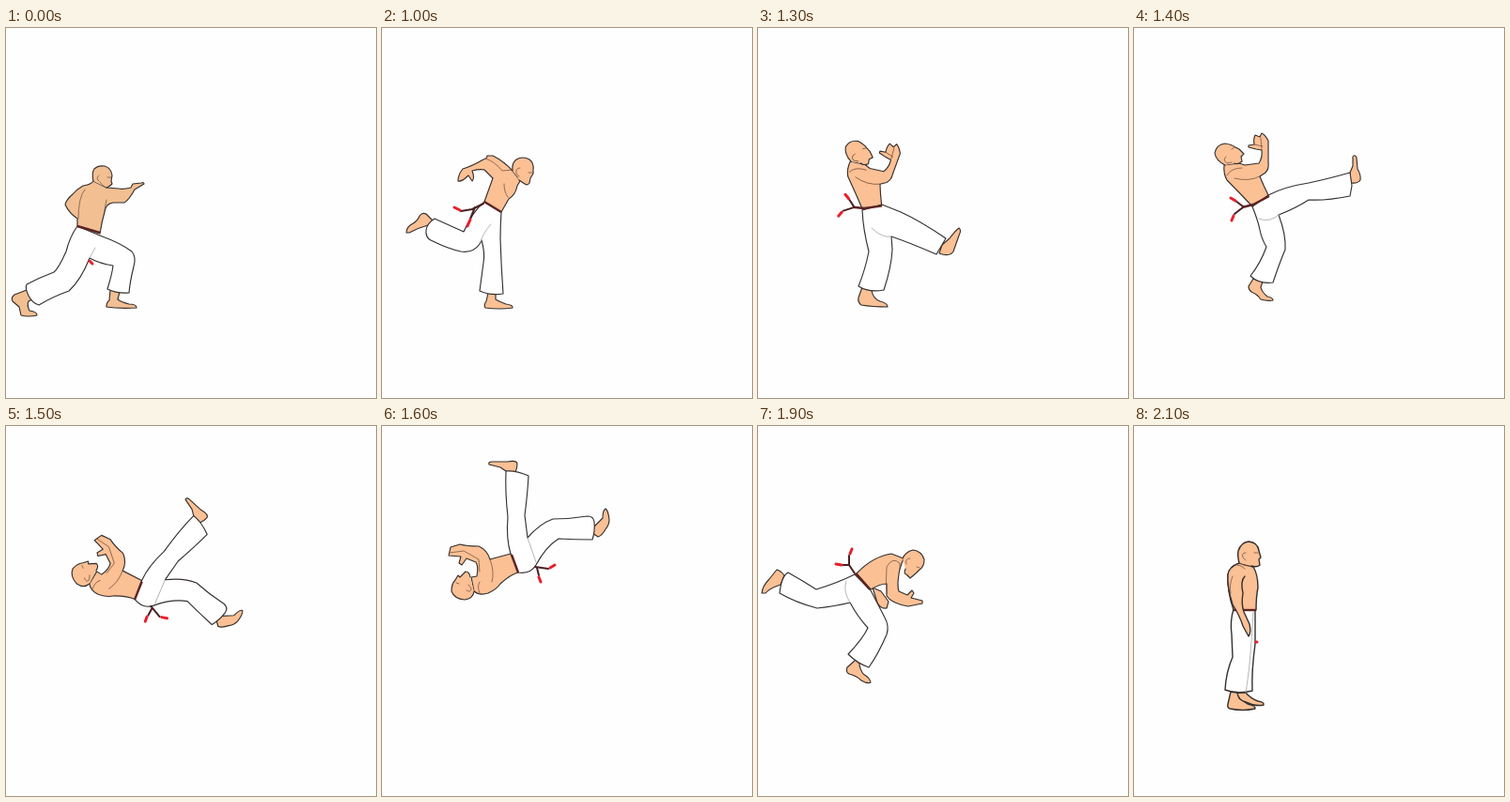
An HTML page without scripts for the animation above (2600 ms loop, 394 by 394 pixels).

```html
<!DOCTYPE html>
<html lang="en">
<head>
<meta charset="utf-8">
<title>Back flip kick</title>
<style>
html, body { margin: 0; width: 100%; height: 100%; overflow: hidden; background: #fefefe; }
svg { display: block; width: 100vw; height: 100vh; }
path { fill: none; stroke: #35302f; stroke-width: 1.15; stroke-linejoin: round; stroke-linecap: round; }
.skin { fill: #fbc094; }
.warm .skin { fill: #f1bf92; }
.cloth { fill: #fff; }
.bold .skin, .bold .cloth { stroke-width: 1.4; }
.line { stroke: #6b4a38; stroke-width: .7; }
.fold { stroke: #a5a5a5; stroke-width: .8; }
.belt { stroke: #5c2424; stroke-width: 2.4; stroke-linecap: butt; }
.cord { stroke: #4a2024; stroke-width: 2; }
.tip { stroke: #e8202c; stroke-width: 3; }

/* each pose is shown for its slot of the 2600 ms loop */
.pose { visibility: hidden; animation: short 2600ms step-end calc(var(--at) * 1ms) infinite; }
.first { animation-name: long; }
.last { animation-name: rest; }
@keyframes short { 0% { visibility: visible; } 3.84615%, 100% { visibility: hidden; } }
@keyframes long { 0% { visibility: visible; } 38.46154%, 100% { visibility: hidden; } }
@keyframes rest { 0% { visibility: visible; } 19.23077%, 100% { visibility: hidden; } }
</style>
</head>
<body>
<svg viewBox="0 0 394 394">

<!-- lunge -->
<g class="pose first warm" style="--at:0">
  <path class="skin" d="M22 279L9 284Q5 287 7 291L14 297 16 306Q24 308 33 306 33 302 25 301 22 295 24 291L28 289Z"/>
  <path class="skin" d="M111 279L110 290Q107 292 107 297 120 299 139 298 139 294 131 294 123 292 119 289L121 281Z"/>
  <path class="cloth" d="M76 211Q68 222 64 238 56 256 51 260 35 266 22 273 20 277 24 285 28 293 35 295 50 286 67 280 80 268 89 245 100 251 114 253 113 262 108 278 118 283 131 282 132 270 136 254 139 244 134 238 122 229 100 221Z"/>
  <path class="fold" d="M89 245L95 234"/>
  <path class="skin" d="M93 163Q90 167 82 168 75 172 71 177 64 183 63 188 67 197 76 203L76 211 100 219Q102 206 106 192 108 187 114 186L126 186Q131 183 137 172L147 166Q147 164 144 165L135 166 133 170Q125 172 120 171L107 170Z"/>
  <path class="line" d="M84 172Q77 180 77 203M107 183L105 194"/>
  <path class="skin" d="M93 163Q91 154 94 150 98 146 105 147 112 149 113 157L112 163 113 166Q110 169 107 170"/>
  <path class="line" d="M99 157q-4 3 0 6M108 159l4 0M100 164q2 4 7 6"/>
  <path class="belt" d="M76 211L100 218"/>
  <path class="tip" d="M89 248l3 3"/>
</g>

<!-- back leg swings, body leans in -->
<g class="pose" style="--at:1000">
  <path class="skin" d="M54 205L47 198Q43 196 40 200 38 206 30 210 26 213 26 218L29 218Q38 213 49 210Z"/>
  <path class="skin" d="M113 282L111 291Q108 295 110 298 126 300 139 298 140 295 132 294 124 291 121 289L121 283Z"/>
  <path class="cloth" d="M109 185Q96 196 87 217L56 203Q48 208 47 215 46 223 52 226 70 235 84 238 97 240 104 230L106 226Q110 240 108 250L104 280Q115 285 129 283 127 255 126 225 126 210 127 196Z"/>
  <path class="fold" d="M105 228Q107 219 116 209"/>
  <path class="skin" d="M139 152Q130 142 118 136L112 136Q112 139 108 140 96 147 86 150 81 156 81 163 85 164 92 157L96 163Q99 160 96 152 104 150 109 151L118 160 109 185 127 196 135 182Q142 178 144 168L147 163Z"/>
  <path class="line" d="M110 139Q120 142 128 152L140 151M130 166q0 9 4 14"/>
  <path class="skin" d="M139 152Q138 144 143 140 150 136 157 140 162 144 161 151L161 155 158 160 157 165Q155 168 152 166L146 162"/>
  <path class="line" d="M147 149q-5 0-4 6l3 3M156 154l4 0M140 154l5 5"/>
  <path class="belt" d="M109 185L127 196"/>
  <path class="cord" d="M108 187L96 193 84 195M99 191L94 203"/>
  <path class="tip" d="M83 194L77 191M94 204L91 211"/>
</g>

<g class="pose" style="--at:1100">
  <path class="skin" d="M63 262Q56 266 56 272L58 284 61 290Q66 288 68 280L72 274Z"/>
  <path class="skin" d="M113 282L111 291Q108 295 110 298 126 300 139 298 140 295 132 294 124 291 121 289L121 283Z"/>
  <path class="cloth" d="M103 191Q97 205 97 220 94 233 84 243 72 250 62 258 64 270 74 277 92 268 104 256L108 248 105 280Q115 285 129 283 128 258 128 230L126 197Z"/>
  <path class="fold" d="M108 248Q114 235 116 215"/>
  <use href="#tall" transform="translate(5 -3) rotate(20 109 197)"/>
</g>

<!-- upright, arms drawn back -->
<g class="pose bold" style="--at:1200">
  <path class="skin" d="M101 283L97 295Q96 299 99 300 115 303 127 301 128 298 119 296L110 290 110 284Z"/>
  <path class="skin" d="M113 284L112 291Q116 297 122 299 133 300 140 298 141 295 131 293L122 290 122 284Z"/>
  <path class="cloth" d="M97 199Q94 208 96 220 99 232 104 244 100 260 93 279 105 285 127 284 128 260 129 234 124 215 121 196Z"/>
  <path class="fold" d="M119 198Q123 215 123 235 123 265 118 284"/>
  <g id="tall">
    <path class="skin" d="M97 148Q80 146 68 150 65 153 67 157 62 161 60 177 55 181 56 186L61 194Q64 194 65 181L72 185Q75 183 71 180L66 176Q69 170 72 165L88 167Q94 180 99 199L121 195Q116 182 116 174 118 164 113 158L110 150Z"/>
    <path class="line" d="M67 156Q80 153 88 154 92 150 98 149M101 166q6 4 12 5"/>
    <path class="skin" d="M97 149Q91 144 91 136 94 127 103 126 112 127 115 133L118 139 116 141 119 147Q118 150 110 150"/>
    <path class="line" d="M102 140q-5 0-3 5l4 3M109 136l4-1"/>
    <path class="belt" d="M98 198L121 196"/>
    <path class="cord" d="M96 208L88 215 79 212M88 215L85 225"/>
    <path class="tip" d="M78 212L72 212M85 226L86 232"/>
  </g>
</g>

<g class="pose" style="--at:1300">
  <path class="skin" d="M111 276L107 287Q106 292 110 295 122 297 138 297 138 293 130 291 122 288 121 279Z"/>
  <path class="skin" d="M196 231L204 224Q210 216 214 213 217 215 214 221L208 238Q204 244 193 240Z"/>
  <path class="cloth" d="M111 194Q112 215 118 238 114 258 107 275 118 282 134 279 142 255 143 236L142 222Q160 228 190 241L200 224Q172 205 152 196L132 188Z"/>
  <path class="fold" d="M121 213Q132 224 142 222"/>
  <use href="#lean" transform="translate(-13 7) rotate(20 135 184)"/>
</g>

<!-- front kick -->
<g class="pose" style="--at:1400">
  <path class="skin" d="M127 267L122 275Q122 279 125 281 132 284 135 289 142 291 148 290 148 287 142 286 136 281 135 276L137 270Z"/>
  <path class="skin" d="M230 154L233 147 233 137Q235 134 237 138L238 150Q242 157 241 162 238 166 231 165Z"/>
  <path class="cloth" d="M126 190Q132 205 134 215 136 225 141 233 135 250 124 264 133 273 148 271 155 250 161 236 162 220 154 199 172 192 186 183 205 184 230 179L232 168 230 154Q205 161 186 165 160 169 143 178Z"/>
  <path class="fold" d="M133 203Q145 208 155 198"/>
  <g id="lean">
    <path class="skin" d="M96 146Q95 155 99 162 112 175 126 190L143 178Q138 168 134 158L140 154Q144 150 143 143L143 120Q139 113 136 112L134 116 129 114Q127 118 128 124L122 125 122 127 130 129 136 130Q137 138 133 144L118 146 112 144Z"/>
    <path class="line" d="M107 160Q122 164 134 158M99 157q4-8 16-8M136 130l-1-13M128 124l9 2"/>
    <path class="skin" d="M97 146Q87 141 86 133 88 124 97 123 104 124 108 127L112 129 117 134 114 137 115 142Q110 146 107 144"/>
    <path class="line" d="M98 137q-4 4 1 7l5-1M104 129l3-2"/>
    <path class="belt" d="M144 179L127 188 115 191"/>
    <path class="cord" d="M116 190L108 184M116 191L107 198"/>
    <path class="tip" d="M108 184L103 181M106 200L104 205"/>
  </g>
</g>

<g class="pose" style="--at:1500">
  <use href="#flip" transform="translate(-3 32) rotate(42 147 148)"/>
</g>

<!-- airborne -->
<g class="pose" style="--at:1600">
  <g id="flip">
    <path class="skin" d="M132 48L126 44 114 41Q113 38 117 38L134 38Q143 36 144 40 144 45 142 49Z"/>
    <path class="skin" d="M226 107L235 98Q235 90 238 88 241 90 242 100 242 105 238 110 234 117 230 118L224 114Z"/>
    <path class="cloth" d="M137 136Q132 120 134 97 131 70 132 48 142 47 156 53 155 72 152 95L155 119Q168 104 182 99 200 99 219 96 225 96 226 102 227 112 224 121 205 121 188 120 174 129 164 148 158 158 145 156Z"/>
    <path class="fold" d="M155 119L164 145"/>
    <path class="skin" d="M137 136L115 142Q112 132 103 128 90 128 83 126L73 129 71 138 84 139 82 146 85 148 90 141 100 145Q103 150 101 160L95 161 98 176Q104 181 113 178 122 174 126 168 137 158 145 156Z"/>
    <path class="line" d="M72 135L87 133 103 142 104 155M115 142Q120 155 117 166M104 178Q101 170 104 166"/>
    <path class="skin" d="M98 176Q97 184 88 185 77 184 74 176 74 168 78 164L81 159 83 161 89 155Q93 155 94 161"/>
    <path class="line" d="M90 175q5 3 5-2l-3-4M79 167l3 1"/>
    <path class="belt" d="M138 137L145 156"/>
    <path class="cord" d="M163 150L177 152M165 151L167 159"/>
    <path class="tip" d="M179 151L184 148M167 161L169 166"/>
  </g>
</g>

<g class="pose" style="--at:1700">
  <use href="#flip" transform="translate(-13 6) rotate(-60 147 148)"/>
</g>

<g class="pose" style="--at:1800">
  <use href="#land" transform="translate(13 -6) rotate(60 108 167)"/>
</g>

<!-- landing on one foot -->
<g class="pose" style="--at:1900">
  <g id="land">
    <path class="skin" d="M28 159Q24 154 20 153 16 158 12 163 5 170 4 178L8 178Q12 173 24 169Z"/>
    <path class="skin" d="M104 249L95 257Q93 262 97 264 105 266 110 271 117 275 120 273 119 268 112 264 108 258 108 253Z"/>
    <path class="skin" d="M122 172L127 188Q130 195 137 194L139 187 131 176Z"/>
    <path class="cloth" d="M103 158Q85 167 62 174 48 165 32 156 25 160 23 178 40 188 63 194 82 192 98 188 106 203 117 215 112 226 96 243 106 253 118 257 128 243 137 222 140 213 135 204L120 175Z"/>
    <path class="fold" d="M94 165Q90 175 98 188"/>
    <path class="skin" d="M105 157Q122 139 142 136L155 141Q150 154 150 158 148 170 150 176L159 180 164 175 166 178 163 183 175 186 175 189 160 192Q142 189 137 181L137 168Q130 168 120 174Z"/>
    <path class="line" d="M137 178Q136 165 137 150 143 139 151 146L151 152"/>
    <path class="skin" d="M154 141Q157 134 165 132 174 133 177 142 177 150 172 153L168 157 162 162 158 158Q155 158 157 152"/>
    <path class="line" d="M162 141q-6 0-4 6M169 150l3 1"/>
    <path class="belt" d="M104 157L119 174"/>
    <path class="cord" d="M103 157L97 148 90 148M97 148L97 138"/>
    <path class="tip" d="M89 148L83 147M98 136L100 131"/>
  </g>
</g>

<g class="pose" style="--at:2000">
  <path class="skin" d="M48 224Q40 224 36 232L30 246 33 250Q40 246 48 240Z"/>
  <path class="skin" d="M102 277L99 290Q98 295 102 297 116 299 130 297 130 293 122 291L114 286 113 279Z"/>
  <path class="cloth" d="M105 175Q90 190 84 206 66 216 48 222 44 232 48 242 72 240 97 230L108 222Q112 236 107 248L98 274Q110 282 122 280 132 255 134 232 134 205 125 189Z"/>
  <path class="fold" d="M108 222Q110 212 114 204"/>
  <use href="#stand" transform="translate(-3 -12) rotate(35 118 196)"/>
</g>

<!-- standing -->
<g class="pose last bold" style="--at:2100">
  <path class="skin" d="M103 283L100 296Q99 300 102 301 116 304 129 301 130 298 121 296L112 290 111 284Z"/>
  <path class="skin" d="M110 284Q111 292 119 294 130 299 138 297 139 294 132 293 124 290 119 284Z"/>
  <path class="cloth" d="M106 195Q102 208 104 222L105 246Q98 262 97 281 110 286 126 282 125 262 129 232L129 196Z"/>
  <path class="fold" d="M127 198Q124 255 119 284"/>
  <path class="tip" d="M130 230l1 0"/>
  <g id="stand">
    <path class="skin" d="M112 146Q101 150 100 158 99 175 106 196L130 196Q130 182 132 172 132 158 127 150Z"/>
    <path class="belt" d="M106 196L130 196"/>
    <path class="skin" stroke="none" d="M100 158Q99 172 105 190 113 203 116 213L122 224Q125 220 123 211L117 198Q114 190 116 178 113 165 118 160"/>
    <path class="line" d="M105 160Q101 170 103 178M110 148q4 0 8 4"/>
    <path class="skin" d="M112 146Q110 138 111 133 114 124 122 123 132 124 133 133L135 140 133 142 134 148Q131 151 125 149"/>
    <path class="line" d="M119 135q-5 0-3 5l3 3M128 135l4 0M113 146q4 3 8 3"/>
  </g>
</g>

</svg>
</body>
</html>
```
